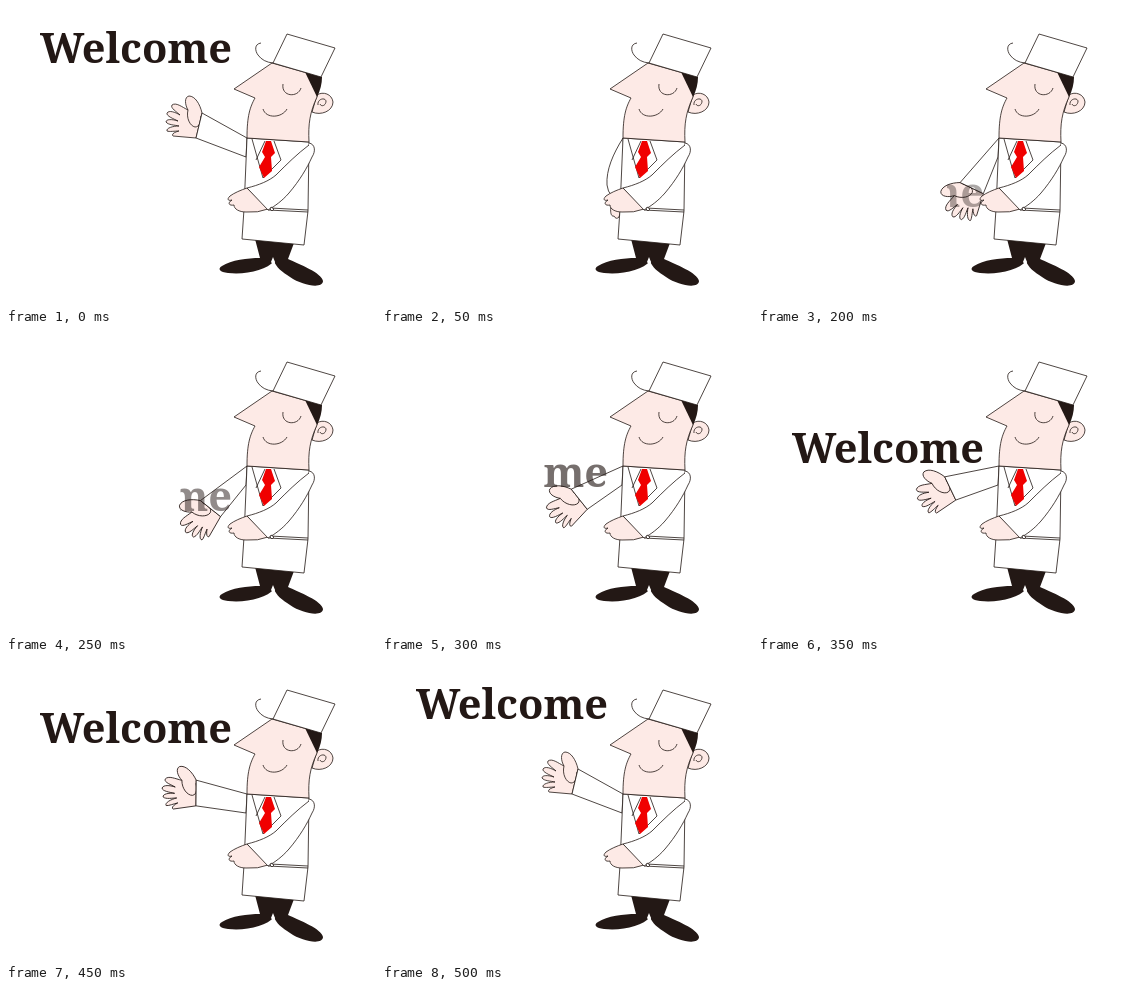
Animation of 370x300 px, one loop 1 s. Source, as an HTML page with a canvas:

```html
<!DOCTYPE html>
<html lang="en">
<head>
<meta charset="utf-8">
<title>Welcome</title>
<style>
html, body { margin: 0; width: 100%; height: 100%; overflow: hidden; background: #fff; }
canvas { display: block; }
</style>
</head>
<body>
<canvas id="stage" width="370" height="300"></canvas>
<script>
const ctx = document.getElementById('stage').getContext('2d');
const INK = '#231815', SKIN = '#fdeae6', RED = '#f00000', WHITE = '#fff';
const LOOP = 1000, STEP = 50, LAST = 10;
const TURN = 13 * Math.PI / 180;
const PIVOT = [242, 138];

function shape(d, fill, line = true) {
  const path = new Path2D(d);
  if (fill) {
    ctx.fillStyle = fill;
    ctx.fill(path);
  }
  if (line) {
    ctx.strokeStyle = INK;
    ctx.lineWidth = 0.8;
    ctx.stroke(path);
  }
}

function swing([x, y], angle) {
  const dx = x - PIVOT[0], dy = y - PIVOT[1];
  const c = Math.cos(angle), s = Math.sin(angle);
  return [PIVOT[0] + dx * c + dy * s, PIVOT[1] - dx * s + dy * c];
}

function wavingArm(angle) {
  const top = swing([196, 107], angle), low = swing([190, 132], angle);
  ctx.save();
  ctx.translate(...PIVOT);
  ctx.rotate(-angle);
  ctx.translate(-PIVOT[0], -PIVOT[1]);
  shape('M196 107C194 98 189 90 183 90C178 91 179 99 182 104C176 101 170 96 166 99' +
    'C164 102 171 106 174 109C169 106 163 104 161 107C160 110 168 113 172 115' +
    'C166 113 160 113 160 116C162 119 169 119 173 120C167 120 160 122 161 125' +
    'C163 126 169 125 173 125C169 126 165 128 167 130L190 132Z', SKIN);
  shape('M182 104C180 112 184 120 189 121C194 121 195 115 195 110');
  ctx.restore();
  shape(`M241 132L${top}L${low}L240 151Z`, WHITE);
}

function restingArm() {
  shape('M241 132C231 148 224 164 225 179Q226 186 229 189L244 190Z', WHITE);
  shape('M229 200C228 206 229 211 232 210Q234 214 237 211L239 204Z', SKIN);
}

function legs() {
  shape('M249 233L288 237L282 253C293 258 316 267 317 275C317 283 297 280 284 271' +
    'C276 266 270 261 268 255C261 264 240 269 222 267C214 266 211 263 216 260' +
    'C225 254 242 252 254 252Z', INK, false);
  shape('M265 256L267 251L269 256L268 260Z', WHITE, false);
}

function coat() {
  shape('M241 132L303 136L302 205L298 239L236 233L238 203Z', WHITE);
  shape('M246 133L257 172L275 154L268 135M259 135L250 154');
  shape('M260 135L265 135L269 147L265 151L266 165L258 172L253 161L259 151L256 146Z', RED, false);
  shape('M264 202L302 204M262 204L302 206');
}

function frontArm() {
  shape('M241 182C235 184 228 187 224 190C220 194 223 195 226 194C221 197 223 200 228 199' +
    'C228 203 233 206 240 206Q252 207 262 203Z', SKIN);
  shape('M303 137C309 138 310 145 306 151C301 162 294 174 283 187C276 195 269 200 262 204' +
    'L241 182C253 179 263 175 270 169C281 158 291 148 303 139', WHITE);
  shape('M265 201L268 203L266 205L264 203Z', WHITE);
}

function head() {
  shape('M311 89C317 85 326 88 327 96C327 105 315 110 306 106Z', SKIN);
  shape('M312 99C311 93 319 91 320 95C320 100 315 101 314 98');
  shape('M266 57L228 83L249 92C244 101 241 110 241 132L303 136C302 118 304 106 311 91L315 71Z', SKIN);
  shape('M299 66L316 71Q316 81 311 91Z', INK, false);
  shape('M277 78C275 91 292 92 295 82M257 103C260 113 276 112 281 103');
  shape('M255 37C248 38 249 45 252 49Q257 56 267 57');
  shape('M281 28L329 42L315 71L267 57Z', WHITE);
}

function greeting(left) {
  if (left > 7) return;
  const fading = left > 3;
  const edge = fading ? 102 + 14.5 * left : 0;
  ctx.save();
  ctx.beginPath();
  ctx.rect(edge, 0, 240 - edge, 218);
  ctx.clip();
  ctx.globalAlpha = fading ? (9 - left) / 8 : 1;
  ctx.fillStyle = INK;
  ctx.font = 'bold 41.5px "Noto Serif", serif';
  ctx.textAlign = 'right';
  ctx.fillText('Welcome', 226, 57 + 24 * left);
  ctx.restore();
}

function draw(now) {
  const step = Math.floor(now % LOOP / STEP);
  const left = step === 0 ? 0 : Math.max(0, LAST - step);
  ctx.fillStyle = WHITE;
  ctx.fillRect(0, 0, 370, 300);
  if (step === 1) restingArm();
  else wavingArm(left * TURN);
  legs();
  coat();
  frontArm();
  head();
  greeting(left);
}

let start;
function tick(now) {
  start ??= now;
  draw(now - start);
  requestAnimationFrame(tick);
}
requestAnimationFrame(tick);
</script>
</body>
</html>
```
